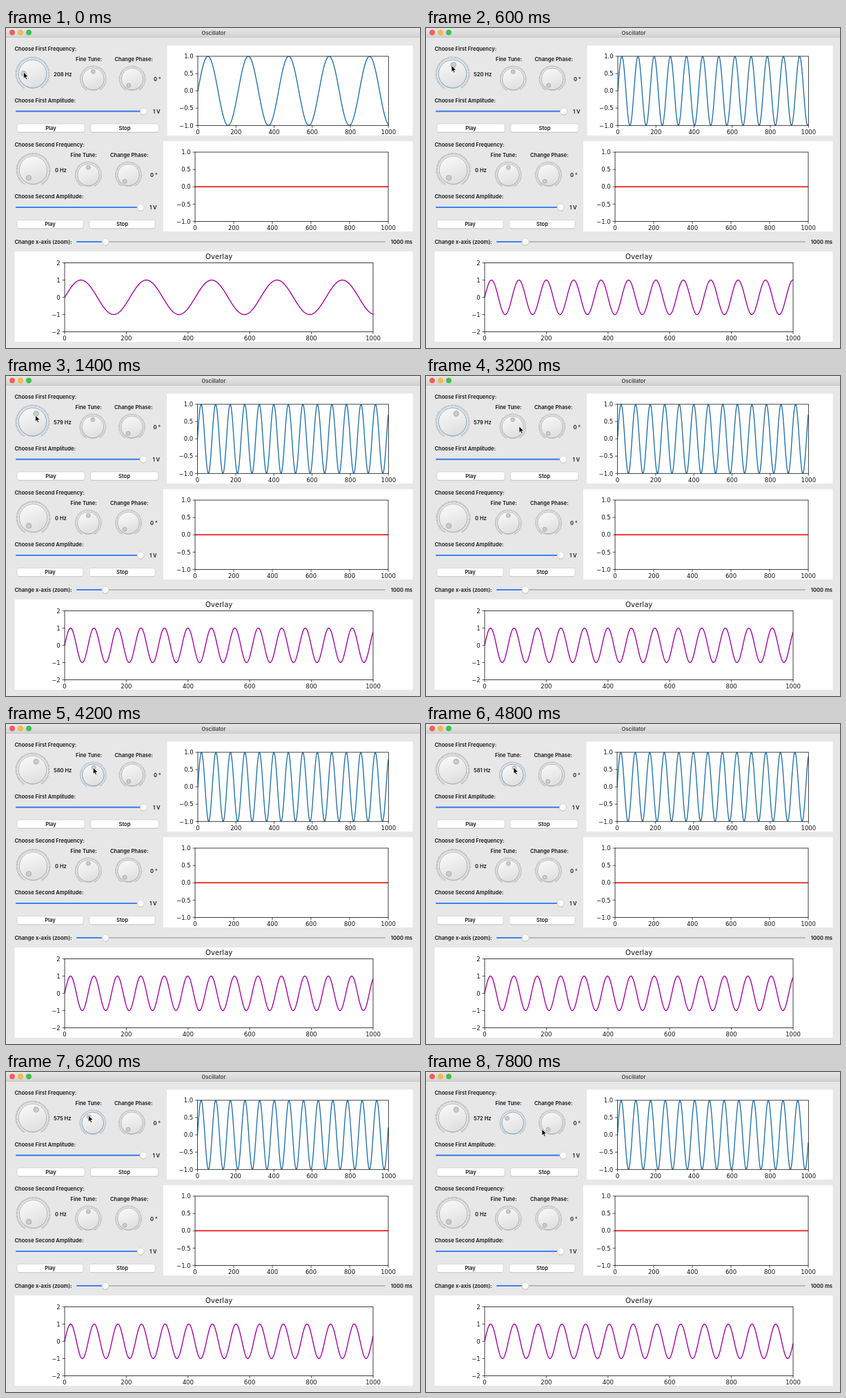
Write an HTML page that moves like this. It is 600x464 px and loops after 8 s.

```html
<!DOCTYPE html>
<html lang="en">
<head>
<meta charset="utf-8">
<title>Oscillator</title>
<style>
  html, body { margin: 0; width: 100%; height: 100%; overflow: hidden; background: #e7e7e7; }
  svg { display: block; }
  .ui { font: 600 7.6px Inter, "Open Sans", sans-serif; fill: #161616; }
  .mid { text-anchor: middle; }
  .end { text-anchor: end; }
  .tick { font: 8.5px "DejaVu Sans", sans-serif; fill: #111; }
  .title { font: 10.1px "DejaVu Sans", sans-serif; fill: #111; text-anchor: middle; }
</style>
</head>
<body>
<svg id="stage" width="600" height="464" viewBox="0 0 600 464"></svg>
<script>
const LOOP = 8000, STEP = 200, OVERLAY_LAG = 40, HZ_PER_CYCLE = 44.07;

// time, coarse frequency, fine tune, pointer x, pointer y
const KEYS = [
  [0, 208, 0, 25.5, 64],
  [200, 285, 0, 26, 60],
  [400, 400, 0, 30, 56],
  [600, 520, 0, 37, 54.5],
  [800, 605, 0, 42.5, 56.5],
  [1000, 642, 0, 45.5, 59.5],
  [1340, 579, 0, 42.5, 57],
  [2400, 579, 0, 42.5, 57],
  [3200, 579, 0, 135, 73],
  [3600, 579, 0, 126, 64],
  [4000, 579, 0, 126, 63.5],
  [4600, 579, 2, 127, 63],
  [5000, 579, 2, 127, 63],
  [6100, 579, -4, 120, 62.5],
  [7000, 579, -7, 116, 66],
  [7300, 579, -7, 118, 67],
  [7800, 579, -7, 168, 83]
];
const FINE_FOCUS = 3600;

function stateAt(time) {
  const t = Math.max(0, time);
  const i = KEYS.findIndex(k => k[0] > t);
  if (i < 0) return KEYS[KEYS.length - 1].slice(1);
  const a = KEYS[i - 1], b = KEYS[i], u = (t - a[0]) / (b[0] - a[0]);
  return a.slice(1).map((v, n) => v + (b[n + 1] - v) * u);
}

const text = (s, x, y, cls = 'ui') => `<text class="${cls}" x="${x}" y="${y}">${s}</text>`;
const circle = (x, y, r, fill, stroke = 'none', w = .6) =>
  `<circle cx="${x}" cy="${y}" r="${r}" fill="${fill}" stroke="${stroke}" stroke-width="${w}"/>`;
const line = (x1, y1, x2, y2, color, w) =>
  `<path d="M${x1} ${y1}L${x2} ${y2}" stroke="${color}" stroke-width="${w}" stroke-linecap="round"/>`;
const box = (x, y, w, h, fill, extra = '') =>
  `<rect x="${x}" y="${y}" width="${w}" height="${h}" fill="${fill}" ${extra}/>`;

function polar(x, y, r, degrees) {
  const a = degrees * Math.PI / 180;
  return [x + r * Math.sin(a), y - r * Math.cos(a)];
}

// Dials sweep 300 degrees, from -150 to 150 measured from the top.
function dial(x, y, r, angle, notches, focus) {
  const ring = r * 1.17, from = polar(x, y, ring, -150), to = polar(x, y, ring, 150);
  const [kx, ky] = polar(x, y, r > 18 ? 13 : 10.7, angle);
  return `<path d="M${from}A${ring} ${ring} 0 1 1 ${to}" fill="none" stroke="${focus ? '#9ba7b3' : '#a2a2a2'}"
      stroke-width="${r * .13}" pathLength="${notches}" stroke-dasharray=".42 .58"/>`
    + circle(x, y + .8, r + .3, '#c4c4c4')
    + circle(x, y, r, 'url(#body)', focus ? '#7fabd6' : '#a4a4a4', focus ? 1 : .7)
    + circle(kx, ky, r > 18 ? 3.8 : 3, '#cbcbcb', '#969696');
}

function slider(x1, x2, value, y) {
  return line(x1, y, x2, y, '#b9b9b9', 1.9) + line(x1, y, value, y, '#3d83ee', 1.9)
    + circle(value, y + .5, 5.2, '#c3c3c3') + circle(value, y, 4.9, '#fdfdfd', '#c2c2c2', .5);
}

function button(label, x, y, w) {
  return box(x, y + .7, w, 12, '#bdbdbd', 'rx="2.7"')
    + box(x, y, w, 12, '#fff', 'rx="2.7" stroke="#c9c9c9" stroke-width=".6"')
    + text(label, x + w / 2, y + 8.8, 'ui mid');
}

function plot({ left, top, right, bottom, labels, color, cycles, amp }) {
  const w = right - left, h = bottom - top, mid = h / 2;
  let d = '', out = '';
  for (let x = 0; x <= w; x += .5)
    d += `${x ? 'L' : 'M'}${x} ${(mid - amp * Math.sin(2 * Math.PI * cycles * x / w)).toFixed(2)}`;
  out += `<svg x="${left}" y="${top}" width="${w}" height="${h}">
    <path d="${d}" fill="none" stroke="${color}" stroke-width="1.35" stroke-linejoin="round"/></svg>`;
  out += box(left, top, w, h, 'none', 'stroke="#111" stroke-width=".8"');
  for (let i = 0; i <= 5; i++) {
    const x = left + w * i / 5;
    out += line(x, bottom, x, bottom + 3, '#111', .7) + text(i * 200, x, bottom + 12.6, 'tick mid');
  }
  labels.forEach((label, i) => {
    const y = top + h * i / (labels.length - 1);
    out += line(left - 3, y, left, y, '#111', .7) + text(label, left - 6.3, y + 3.2, 'tick end');
  });
  return out;
}

const UNIT = ['1.0', '0.5', '0.0', '−0.5', '−1.0'];
const DEFS = `<defs>
  <linearGradient id="body" x1=".3" y1="0" x2=".7" y2="1">
    <stop offset="0" stop-color="#f8f8f8"/><stop offset="1" stop-color="#dedede"/></linearGradient>
  <linearGradient id="bar" x1="0" y1="0" x2="0" y2="1">
    <stop offset="0" stop-color="#e6e6e6"/><stop offset="1" stop-color="#d3d3d3"/></linearGradient>
</defs>`;

const chrome = DEFS + box(0, 0, 600, 464, '#e7e7e7') + box(0, 0, 600, 13, 'url(#bar)')
  + box(0, 13, 600, .6, '#b5b5b5')
  + circle(9, 6.5, 3.7, '#fc5b57', '#df4744', .4)
  + circle(21, 6.5, 3.7, '#fdbc40', '#de9f34', .4)
  + circle(33, 6.5, 3.7, '#34c84a', '#27aa35', .4)
  + `<g opacity=".75">${text('Oscillator', 301, 9.6, 'ui mid')}</g>`
  + text('Choose First Frequency:', 12.5, 33) + text('Choose First Amplitude:', 12.5, 107.5);

const secondRow = text('Choose Second Frequency:', 12.5, 172) + text('Choose Second Amplitude:', 12.5, 247)
  + text('Fine Tune:', 93.5, 186.5) + text('Change Phase:', 151, 186.5)
  + dial(39.5, 206, 20.3, -150, 100) + dial(119.3, 213, 15.8, 0, 44) + dial(177.5, 213, 15.8, -150, 110)
  + text('0 Hz', 71, 208.7) + text('0 °', 209, 215.7)
  + slider(15, 199, 195, 260) + text('1 V', 208, 263)
  + button('Play', 16, 278.5, 96) + button('Stop', 121, 278.5, 95)
  + box(228, 164, 361.5, 131, '#fff')
  + plot({ left: 274, top: 180, right: 554, bottom: 280.5, labels: UNIT, color: '#f00000', cycles: 0, amp: 0 });

const zoomRow = text('Change x-axis (zoom):', 12.5, 313) + slider(103, 549, 144, 310)
  + text('1000 ms', 589, 313, 'ui end')
  + box(12.5, 324, 577, 131, '#fff') + text('Overlay', 308.7, 335, 'title');

function firstRow(time, coarse, fine) {
  const hz = String(Math.round(coarse + fine));
  // Narrow digits pull everything right of the readout slightly left.
  const shift = [...hz].reduce((sum, c) => sum - (c === '1' ? 1 : c === '7' ? .5 : 0), 0);
  const fineFocus = time >= FINE_FOCUS;
  return dial(38.5, 66.5, 20.3, coarse * .3 - 150, 100, !fineFocus)
    + text(hz + ' Hz', 69, 69.6)
    + `<g transform="translate(${shift})">`
    + text('Fine Tune:', 101, 47.6) + text('Change Phase:', 157.5, 47.6)
    + dial(126.3, 74, 15.8, fine * 7.3, 44, fineFocus) + dial(183, 74, 15.8, -150, 110)
    + text('0 °', 214, 76.7) + text('1 V', 213, 123.7)
    + button('Stop', 123, 139, 98) + '</g>'
    + slider(15, 203 + shift, 199.5 + shift, 120.8) + button('Play', 16, 139, 98)
    + box(233.5 + shift, 25.5, 356 - shift, 130.5, '#fff')
    + plot({ left: 278 + shift, top: 41, right: 554.3, bottom: 141.3, labels: UNIT,
             color: '#1f6fa8', cycles: hz / HZ_PER_CYCLE, amp: 50.1 });
}

function overlay(time) {
  const [coarse, fine] = stateAt(time - OVERLAY_LAG);
  return plot({ left: 85, top: 340.5, right: 532, bottom: 440.5, labels: [2, 1, 0, '−1', '−2'],
                color: '#a0009f', cycles: Math.round(coarse + fine) / HZ_PER_CYCLE, amp: 25 });
}

const pointer = (x, y) => `<path transform="translate(${x} ${y})" d="M0 0V9.2L2.1 7.3L3.5 10.5L5.1 9.8L3.7 6.7L6.6 6.6Z"
  fill="#000" stroke="#fff" stroke-width=".7" stroke-linejoin="round"/>`;

const stage = document.getElementById('stage');
let start, shown = -1;

function draw(now) {
  start ??= now;
  const time = Math.floor((now - start) % LOOP / STEP) * STEP;
  if (time !== shown) {
    const [coarse, fine, x, y] = stateAt(time);
    stage.innerHTML = chrome + firstRow(time, coarse, fine) + secondRow + zoomRow + overlay(time) + pointer(x, y);
    shown = time;
  }
  requestAnimationFrame(draw);
}
draw(performance.now());
</script>
</body>
</html>
```
